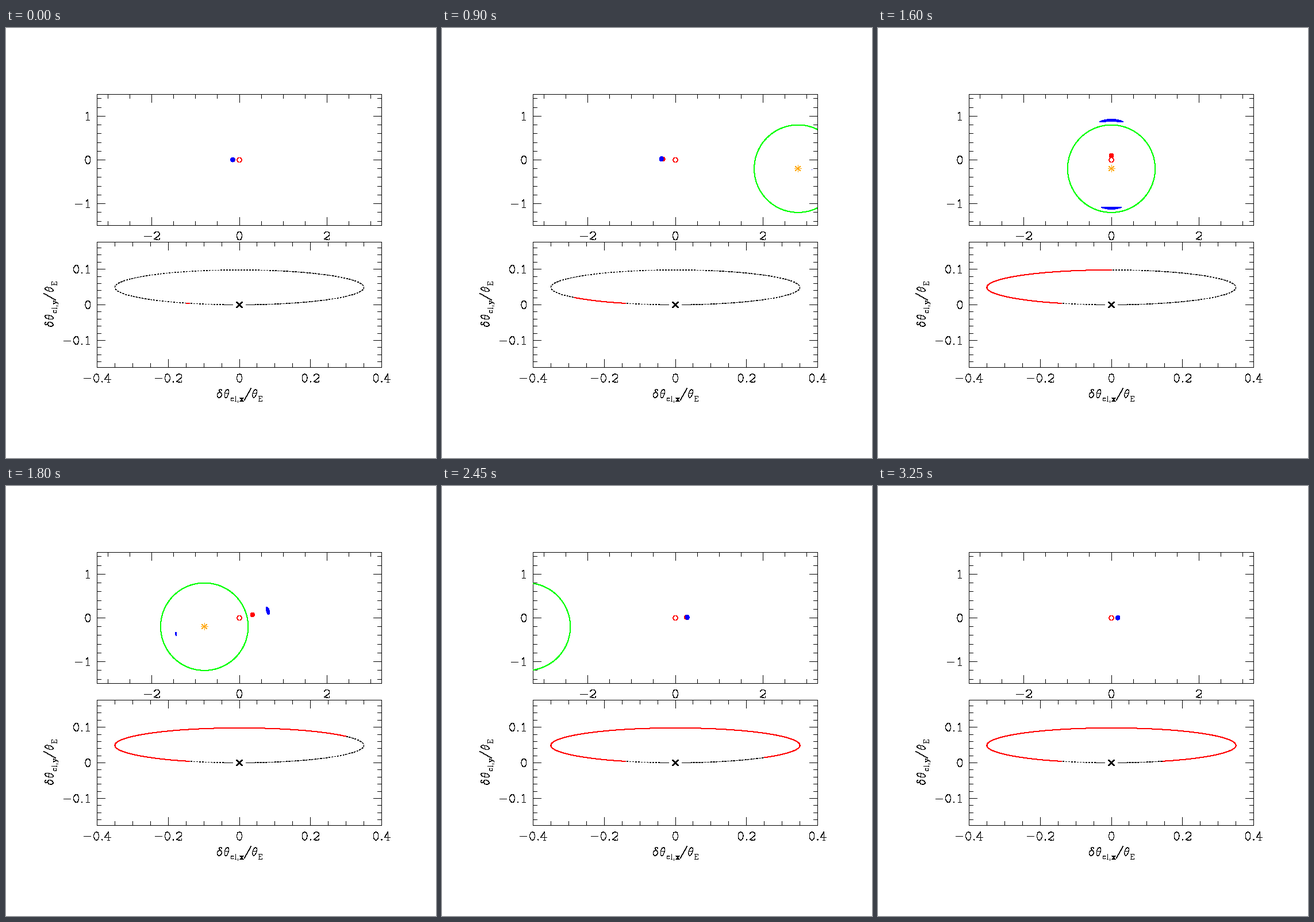
Animation of 748 by 748 pixels, one loop 3300 ms. Source, as a matplotlib script:

```python
import numpy as np
import matplotlib.pyplot as plt
from matplotlib.animation import FuncAnimation
from matplotlib.collections import LineCollection
from matplotlib.patches import Circle, Polygon, Rectangle

SIZE, DPI, FRAMES, STEP = 748, 100, 66, 50
PX = 72 / DPI               # one pixel in points
THIN, BOLD = 0.4 * PX, PX   # aliased strokes of one and two pixels
IMPACT, RHO = 0.2, 0.05     # lens offset and source radius
TEXT, SUB = 0.67, 0.4       # pixels per glyph unit

fig = plt.figure(figsize=(SIZE / DPI, SIZE / DPI), dpi=DPI, facecolor="white")
ax = fig.add_axes([0, 0, 1, 1])
ax.set(xlim=(0, SIZE), ylim=(SIZE, 0))
ax.axis("off")


# ---- stroke lettering: x from the glyph centre, y up from the baseline ----
def arc(rx, ry, cy, start=0, stop=360, slant=0.0):
    a = np.radians(np.linspace(start, stop, 25))
    y = ry * np.sin(a)
    return np.column_stack([rx * np.cos(a) + slant * y, cy + y])


def serif(x, y, half=3):
    return [(x - half, y), (x + half, y)]


def stem(x, top=21):
    return [(x, 0), (x, top)]


GLYPHS = {  # advance width, strokes
    "0": (20, arc(6.5, 10.5, 10.5)),
    "1": (20, [(-4, 17), (0, 21), (0, 0)], serif(0.5, 0, 4.5)),
    "2": (20, [*arc(7, 6, 15, 170, -40), (-7, 1), (6, 0), (7, 4)]),
    "4": (20, [(2, 0), (2, 21), (-8, 6), (8, 6)], serif(2, 0)),
    "-": (26, serif(0, 9, 9)),
    ".": (10, arc(1, 1, 1)),
    ",": (10, [(0, 1), (0, -1), (-1, -5)]),
    "/": (19, [(9, 25), (-9, -7)]),
    "θ": (18, arc(5, 10.5, 10.5, slant=0.22), serif(0, 11, 5)),
    "δ": (19, arc(5.5, 7, 7, slant=0.15),
          [(4, 11), (-1, 18), (0, 21), (3, 21), (6, 18)]),
    "c": (19, arc(6.5, 7, 7, 40, 320)),
    "l": (11, stem(0), serif(0, 0)),
    "x": (20, [(-6, 14), (6, 0)], [(6, 14), (-6, 0)],
          *[serif(x, y) for x in (-5, 5) for y in (0, 14)]),
    "y": (19, [(-6, 14), (0, 0)], [(6, 14), (-3, -6), (-7, -6)],
          serif(-5, 14), serif(5, 14)),
    "E": (21, stem(-5), serif(-1, 11), [(-8, 21), (7, 21), (7, 16)],
          [(-8, 0), (7, 0), (7, 5)]),
}


def snap(points):
    """Move points to pixel centres."""
    return np.floor(points) + 0.5


def draw(segments, color="black", width=THIN):
    lines = LineCollection(segments, colors=color, linewidths=width,
                           antialiaseds=False, snap=False)
    ax.add_collection(lines)
    return lines


def write(runs, x, y, align=0.5, upright=False):
    """Draw (text, scale, drop) runs along one baseline."""
    total = sum(s * GLYPHS[ch][0] for text, s, _ in runs for ch in text)
    pen, segments = -align * total, []
    for text, scale, drop in runs:
        for ch in text:
            width, *strokes = GLYPHS[ch]
            for stroke in strokes:
                px, py = scale * np.array(stroke, float).T
                px, py = pen + scale * width / 2 + px, drop - py
                if upright:
                    px, py = py, -px
                segments.append(snap(np.column_stack([x + px, y + py])))
            pen += scale * width
    draw(segments)


class Panel:
    def __init__(self, left, top, right, bottom, half_width):
        self.box = left, top, right, bottom
        self.cx, self.cy = (left + right) / 2, (top + bottom) / 2
        self.scale = (right - left) / 2 / half_width
        self.frame = Rectangle((left, top), right - left, bottom - top,
                               fill=False, lw=THIN, ec="black", aa=False,
                               snap=False)
        ax.add_patch(self.frame)

    def px(self, x, y):
        return self.cx + self.scale * x, self.cy - self.scale * y

    def ticks(self, xstep, xevery, ystep, yevery):
        left, top, right, bottom = self.box
        sides = ((xstep, xevery, left, right, top, bottom, 1),
                 (ystep, yevery, top, bottom, left, right, -1))
        for step, every, lo, hi, near, far, order in sides:
            n = int((hi - lo) / 2 / self.scale / step + 1e-6)
            for i in range(-n, n + 1):
                at = snap((lo + hi) / 2 + i * step * self.scale)
                size = 7 if i % every else 14
                draw([[(at, a)[::order], (at, b)[::order]]
                      for a, b in ((near, near + size), (far, far - size))])

    def labels(self, xs, ys, base):
        for v in xs:
            write([(f"{v:g}", TEXT, 0)], self.px(v, 0)[0], base)
        for v in ys:
            write([(f"{v:g}", TEXT, 0)], 149, self.px(0, v)[1] + 7, align=1)


sky = Panel(158.5, 115.5, 653.5, 343.5, 3.25)
shift = Panel(158.5, 372.5, 653.5, 590.5, 0.4)
sky.ticks(0.5, 4, 0.2, 5)
shift.ticks(0.05, 4, 0.02, 5)
sky.labels((-2, 0, 2), (-1, 0, 1), 368.5)
shift.labels((-0.4, -0.2, 0, 0.2, 0.4), (-0.1, 0, 0.1), 616)


def axis_title(axis):
    return [("δθ", TEXT, 0), ("cl," + axis, SUB, 6), ("/θ", TEXT, 0),
            ("E", SUB, 6)]


write(axis_title("x"), 406, 643)
write(axis_title("y"), 82, 481, upright=True)


# ---- lensing ----
def centroid(lens_x):
    """Light centroid relative to the source for a lens at lens_x."""
    d = lens_x ** 2 + IMPACT ** 2 + 2
    return -lens_x / d, IMPACT / d


def images(lens_x):
    """Outlines of both images of the source disc."""
    a = np.linspace(0, 2 * np.pi, 120)
    ux, uy = RHO * np.cos(a) - lens_x, RHO * np.sin(a) + IMPACT
    u = np.hypot(ux, uy)
    for sign in (1, -1):
        k = (u + sign * np.sqrt(u * u + 4)) / (2 * u)
        yield np.column_stack(sky.px(lens_x + k * ux, k * uy - IMPACT))


def path(lens_x, color="black", lw=THIN, **style):
    return ax.plot(*shift.px(*centroid(lens_x)), color=color, lw=lw,
                   antialiased=False, snap=False, **style)[0]


def patch(p, z):
    p.set(antialiased=False, snap=False, zorder=z)
    ax.add_patch(p)
    p.set_clip_path(sky.frame)
    return p


# full path, dotted except for its far ends
far = np.arcsinh(22.5)
dash = 2.2 * PX / THIN
path(np.sinh(np.linspace(far, -far, 900)), dashes=(dash, dash),
     dash_capstyle="butt")
for side in (-1, 1):
    path(side * np.linspace(22.5, 51, 60))

trail = path(np.array([6.8, 6.4]), "red", BOLD, zorder=4)
cross = np.array([(-5, -5), (5, 5)])
draw([cross + shift.px(0, 0), cross * (1, -1) + shift.px(0, 0)],
     width=BOLD).set_zorder(5)

ring = patch(Circle((0, 0), sky.scale, fill=False, ec="lime", lw=BOLD), 3)
star = draw([], "orange")
star.set(zorder=4)
star.set_clip_path(sky.frame)
patch(Circle(sky.px(0, 0), 4, fill=False, ec="red", lw=THIN), 5)
dot = patch(Circle((0, 0), 3.7, fc="red", ec="none"), 6)
blobs = [patch(Polygon(p, fc="blue", ec="none"), 7) for p in images(6.4)]

spokes = np.arange(4) * np.pi / 4
ARMS = 6 * np.column_stack([np.cos(spokes), np.sin(spokes)])


def update(i):
    lens_x = 0.2 * (32 - i)
    lens = np.array(sky.px(lens_x, -IMPACT))
    ring.center = tuple(lens)
    star.set_segments([snap([lens - arm, lens + arm]) for arm in ARMS])
    star.set_visible(abs(lens_x) < 3.25)
    dot.center = sky.px(*centroid(lens_x))
    for blob, outline in zip(blobs, images(lens_x)):
        blob.set_xy(outline)
    trail.set_data(*shift.px(*centroid(np.linspace(6.8, lens_x, 8 * i + 12))))
    return [ring, star, dot, trail, *blobs]


anim = FuncAnimation(fig, update, frames=FRAMES, interval=STEP, repeat=True,
                     repeat_delay=0, blit=False)
plt.show()
```
